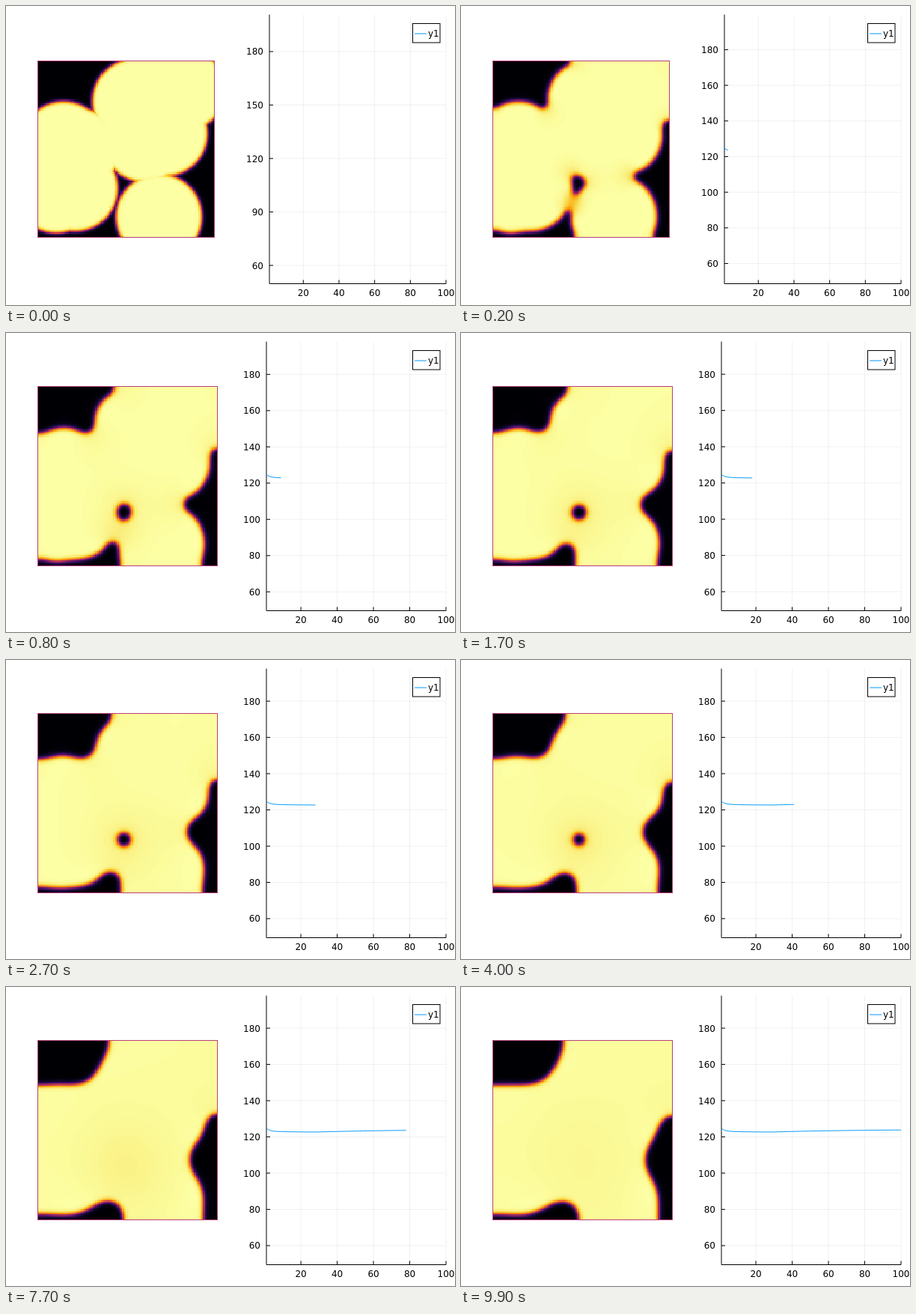
An HTML page with a canvas that plays this animation: 600 by 400 pixels, repeating every 10000 ms.

```html
<!DOCTYPE html>
<html lang="en">
<head>
<meta charset="utf-8">
<title>Phase field</title>
<style>
  html, body { margin: 0; width: 100%; height: 100%; overflow: hidden; background: #fff; }
  canvas { display: block; }
</style>
</head>
<body>
<canvas id="stage" width="600" height="400"></canvas>
<script>
const N = 100, W = N + 2, LOOP = 10000, STEP = 100;
const RADIUS = 24.5, STIFFNESS = 1.1, RATE = 0.02, SUBSTEPS = 170;
const ctx = document.getElementById('stage').getContext('2d');
const grid = document.createElement('canvas');
grid.width = grid.height = N;
const gridCtx = grid.getContext('2d');
const image = gridCtx.createImageData(N, N);

// Inferno colour ramp
const ramp = ['000004', '1b0c41', '4a0c6b', '781c6d', 'a52c60', 'cf4446', 'ed6925', 'fb9b06', 'f7d13d', 'fcffa4']
  .map(h => [0, 2, 4].map(i => parseInt(h.slice(i, i + 2), 16)));
const palette = Array.from({ length: 256 }, (_, i) => {
  const x = i / 255 * 9, k = Math.min(8, Math.floor(x));
  return ramp[k].map((c, j) => Math.round(c + (ramp[k + 1][j] - c) * (x - k)));
});

// Cahn-Hilliard flow on a padded grid, starting from a union of equal discs
const discs = [[55.2, 23], [68, 14], [81.7, 16.2], [71.8, 41], [60.7, 44.5],
  [14.6, 47.3], [22, 50.7], [10.5, 73.2], [21, 72.2], [68.6, 88.3]];
const u = new Float64Array(W * W), mu = new Float64Array(W * W);
const frames = [];

function eachCell(visit) {
  for (let y = 1; y <= N; y++)
    for (let x = 1; x <= N; x++) visit(x, y, y * W + x);
}

// Copies the rim outward so that nothing flows through the walls
function mirror(a) {
  for (let i = 1; i <= N; i++) {
    a[i] = a[i + W];
    a[(N + 1) * W + i] = a[N * W + i];
    a[i * W] = a[i * W + 1];
    a[i * W + N + 1] = a[i * W + N];
  }
}

const laplacian = (a, i) => a[i - 1] + a[i + 1] + a[i - W] + a[i + W] - 4 * a[i];

function evolve() {
  mirror(u);
  for (let y = 1; y <= N; y++)
    for (let i = y * W + 1, end = i + N; i < end; i++) {
      const c = u[i];
      mu[i] = 2 * c * (1 - c) * (1 - 2 * c) - STIFFNESS * laplacian(u, i);
    }
  mirror(mu);
  for (let y = 1; y <= N; y++)
    for (let i = y * W + 1, end = i + N; i < end; i++) u[i] += RATE * laplacian(mu, i);
}

eachCell((x, y, i) => {
  const depth = Math.max(...discs.map(([a, b]) => RADIUS - Math.hypot(x - 0.5 - a, y - 0.5 - b)));
  u[i] = 0.5 + 0.5 * Math.tanh(depth / 1.1);
});

// Shade indices of frame n, computed once and kept
function shades(n) {
  while (frames.length <= n) {
    if (frames.length) for (let s = 0; s < SUBSTEPS; s++) evolve();
    const frame = new Uint8ClampedArray(N * N);
    eachCell((x, y, i) => { frame[(y - 1) * N + x - 1] = u[i] * 255; });
    frames.push(frame);
  }
  return frames[n];
}

// Fast drop, slow sag, then a saturating rise
const series = Array.from({ length: 100 }, (_, i) =>
  122.65 + 0.5 * Math.exp(-i / 12) + 1.6 * Math.exp(-i / 1.8)
  + 1.5 * (1 - Math.exp(-Math.max(0, i - 28) / 47)));

function line(color, ...points) {
  ctx.strokeStyle = color;
  ctx.beginPath();
  points.forEach(([x, y]) => ctx.lineTo(x, y));
  ctx.stroke();
}

function label(text, x, y, align) {
  ctx.fillStyle = '#000';
  ctx.textAlign = align;
  ctx.fillText(text, x, y);
}

function drawHeatmap(n, size) {
  shades(n).forEach((shade, i) => image.data.set([...palette[shade], 255], i * 4));
  gridCtx.putImageData(image, 0, 0);
  const top = 191.5 - size / 2;
  ctx.imageSmoothingEnabled = false;
  ctx.drawImage(grid, 42.5, top, size, size);
  ctx.strokeStyle = '#b8407a';
  ctx.strokeRect(42.5, top, size, size);
}

function drawChart(n, size) {
  const edge = 588, left = edge - size, top = 11.5, base = 371.5, scale = size / 99;
  const seen = series.slice(0, n + 1);
  const mid = n ? (Math.min(...seen) + Math.max(...seen)) / 2 : 125.25;
  const px = x => left + (x - 1) * scale;
  const py = y => 191.5 - (y - mid) * scale;
  const grey = 'rgba(0,0,0,0.06)';

  for (let x = 20; x <= 100; x += 20) {
    line(grey, [px(x), top], [px(x), base]);
    line('#000', [px(x), base], [px(x), base - 5]);
    label(x, px(x), 387.5, 'center');
  }
  for (let y = 60; y <= 180; y += n ? 20 : 30) {
    line(grey, [left, py(y)], [edge, py(y)]);
    line('#000', [left, py(y)], [left + 5, py(y)]);
    label(y, left - 8, py(y) + 4.5, 'right');
  }
  line('#000', [left, top], [left, base], [edge, base]);
  if (n) line('#009afa', ...seen.map((y, i) => [px(i + 1), py(y)]));

  ctx.fillStyle = '#fff';
  ctx.fillRect(543.5, 23.5, 36.5, 25.5);
  ctx.strokeStyle = '#000';
  ctx.strokeRect(543.5, 23.5, 36.5, 25.5);
  line('#009afa', [546, 37], [562, 37]);
  label('y1', 564, 41, 'left');
}

let shown = -1;
function tick() {
  const n = Math.floor(performance.now() % LOOP / STEP);
  if (n !== shown) {
    shown = n;
    const size = n < 4 ? 236 : 240;
    ctx.fillStyle = '#fff';
    ctx.fillRect(0, 0, 600, 400);
    ctx.font = '12px "DejaVu Sans", sans-serif';
    ctx.lineWidth = 1;
    drawHeatmap(n, size);
    drawChart(n, size);
  }
  requestAnimationFrame(tick);
}
tick();
</script>
</body>
</html>
```
